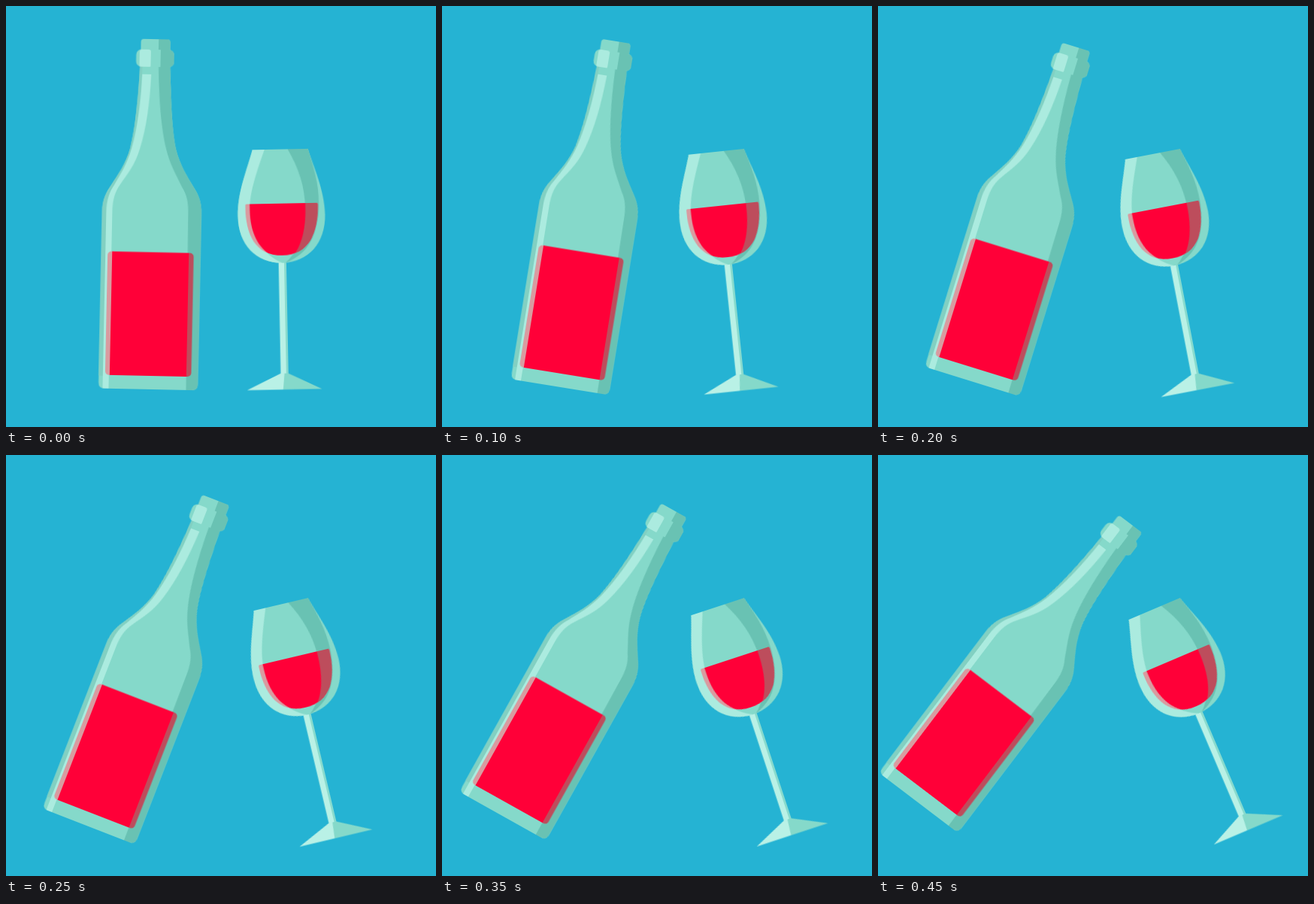
Animation of 572 by 560 pixels, one loop 500 ms. Source, as an HTML page without scripts:

```html
<!DOCTYPE html>
<html lang="en">
<head>
<meta charset="utf-8">
<title>Wine bottle and glass</title>
<style>
  html, body { margin: 0; width: 100%; height: 100%; overflow: hidden; background: #25b3d3; }
  svg { display: block; width: 572px; height: 560px; }
  .mid { fill: #85d9ca; }
  .light { fill: #abebdf; }
  .pale { fill: #b9f1e6; }
  .dark { fill: #69c2b3; }
  .edge { fill: #82d0c2; }
  .wine { fill: #ff0038; }
  .wine-light { fill: #d99ba0; }
  .wine-dark { fill: #bd4d5c; }
  .bottle { animation: tip-right .5s steps(10) infinite; }
  .glass { animation: tip-left .5s steps(10) infinite; }
  @keyframes tip-right { from { transform: rotate(1.2deg); } to { transform: rotate(41.2deg); } }
  @keyframes tip-left { from { transform: rotate(-1.1deg); } to { transform: rotate(-25.5deg); } }
</style>
</head>
<body>
<svg viewBox="0 0 572 560">
  <defs>
    <clipPath id="body">
      <path d="M20-200C22-150 24-115 30-88C36-66 46-52 54-39C60-30 66-20 65.5-2V224Q65.5 232 57.5 232H-58.5Q-66.5 232-66.5 224V-2C-67-20-61-30-55-39C-47-52-37-66-31-88C-25-115-22-150-20-200Z"/>
    </clipPath>
    <clipPath id="lip"><rect x="-19.5" y="-234" width="39" height="24" rx="4"/></clipPath>
    <clipPath id="ring"><rect x="-25.5" y="-220" width="50.5" height="23" rx="7"/></clipPath>
    <clipPath id="label"><rect x="-58" y="49.5" width="114.5" height="164.5" rx="5"/></clipPath>
    <clipPath id="fill"><path d="M-46 72H47Q49 72 49 75C48 112 36 141 0 141S-48 112-48 75Q-48 72-46 72Z"/></clipPath>
  </defs>

  <g transform="translate(194.3 278)">
    <g class="bottle">
      <g clip-path="url(#body)">
        <rect class="mid" x="-70" y="-200" width="140" height="435"/>
        <path class="edge" d="M-17-200V-187C-18-150-22-115-29-88C-35-66-44-52-51-39C-57-30-61-20-61-2V215H-70V-200Z"/>
        <path class="light" d="M-17-187H-5C-6-150-10-115-18-88C-24-66-34-54-43-40C-50-30-53-20-53-2V235H-61V-2C-61-20-57-30-51-39C-44-52-35-66-29-88C-22-115-18-150-17-187Z"/>
        <path class="dark" d="M4.500-200C6-150 10-115 17-88C22-68 32-52 39-38C46-27 48-18 48-2L50 235H70V-200Z"/>
      </g>
      <g clip-path="url(#lip)">
        <rect class="mid" x="-20" y="-234" width="40" height="24"/>
        <rect class="dark" x="4" y="-234" width="16" height="24"/>
      </g>
      <g clip-path="url(#ring)">
        <rect class="mid" x="-26" y="-220" width="52" height="24"/>
        <rect class="light" x="-21" y="-220" width="15" height="24" rx="3"/>
        <rect class="dark" x="7" y="-220" width="19" height="24"/>
      </g>
      <g clip-path="url(#label)">
        <rect class="wine-light" x="-58" y="49" width="8" height="166"/>
        <rect class="wine" x="-52" y="49" width="102" height="166"/>
        <rect class="wine-dark" x="50" y="49" width="8" height="166"/>
      </g>
    </g>
  </g>

  <g transform="translate(402 190)">
    <g class="glass">
      <g transform="translate(-37.3 0)">
        <path class="pale" d="M-5 148H5V298L-2 319.500H-50L-5 298Z"/>
        <path class="mid" d="M2.500 148H5V298L49.500 319.500H-2L0 298H2.500Z"/>
        <path class="mid" d="M-37 0H37C44 25 58 55 58 88C58 125 35 151 0 151S-58 125-58 88C-58 55-44 25-37 0Z"/>
        <path class="light" d="M-37 0H-21C-30 25-42 55-42 80C-42 115-25 140 0 151C-35 151-58 125-58 88C-58 55-44 25-37 0Z"/>
        <path class="dark" d="M10 0H37C43 22 51 45 50 75C49 112 36 140 4 151C18 140 32 115 32 80C32 50 24 25 10 0Z"/>
        <g clip-path="url(#fill)">
          <rect class="wine-light" x="-50" y="72" width="100" height="70"/>
          <path class="wine" d="M-42 72H40V142H-12C-30 133-42 112-42 80Z"/>
          <path class="wine-dark" d="M32 72H50V142H14C25 131 32 108 32 80Z"/>
        </g>
      </g>
    </g>
  </g>
</svg>
</body>
</html>
```
